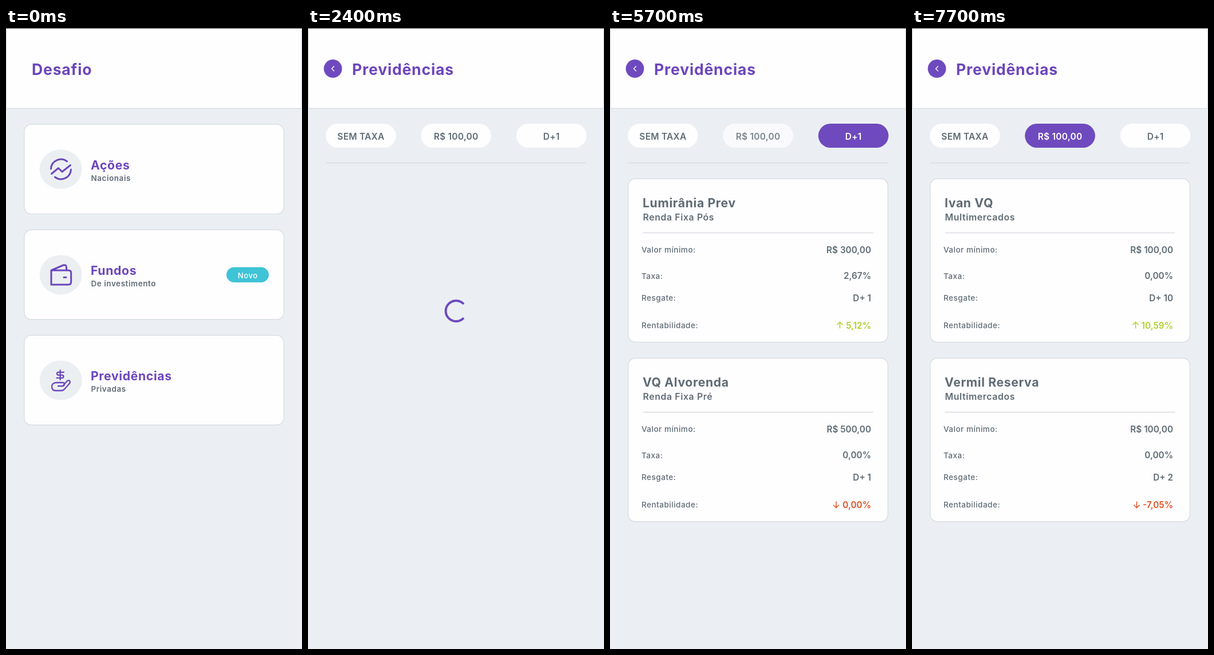
Recreate the animation shown at these times as an HTML page. Size 517 by 1084 pixels, loop 8 s.

```html
<!DOCTYPE html>
<html lang="pt-BR">
<head>
<meta charset="utf-8">
<title>Desafio</title>
<style>
  html, body { margin: 0; width: 100%; height: 100%; overflow: hidden; background: #ebeff3; }
  svg { display: block; width: 517px; height: 1084px; }
  text { font-family: Inter, "Open Sans", sans-serif; fill: #5f6b74; }
  .head { font-size: 26.6px; font-weight: 700; letter-spacing: .03em; fill: #6b46bb; }
  .title { font-size: 21.2px; font-weight: 700; letter-spacing: .03em; }
  .purple { fill: #6b46bb; }
  .sub { font-size: 13.5px; font-weight: 600; letter-spacing: .04em; }
  .kind { font-size: 15.8px; font-weight: 600; letter-spacing: .04em; }
  .label { font-size: 13.6px; font-weight: 500; letter-spacing: .034em; }
  .value { font-size: 15.3px; font-weight: 600; text-anchor: end; }
  .pill { font-size: 15.5px; font-weight: 600; letter-spacing: .015em; text-anchor: middle; }
  .note { font-size: 16px; font-weight: 500; letter-spacing: .04em; text-anchor: middle; }
  .badge { font-size: 13.2px; font-weight: 500; letter-spacing: .04em; text-anchor: middle; fill: #fff; }
  .card { fill: #fefdff; stroke: #d9dee1; stroke-width: 1.4; }
  .rule { stroke: #d9dde1; stroke-width: 1.7; }
  .icon { fill: none; stroke: #6b46bb; stroke-width: 3; stroke-linecap: round; stroke-linejoin: round; }
</style>
</head>
<body>
<svg id="stage" viewBox="0 0 517 1084"></svg>
<script>
const LOOP = 8000, STEP = 100, PURPLE = '#6e4abe', WHITE = '#fefdff';
const stage = document.getElementById('stage');

const OPEN = 1900, LOADED = 2500;
const TOGGLE_DAY = 3570, TOGGLE_MIN = 5850, UNTOGGLE_DAY = 7450;

const funds = [
  { name: 'Ivan VQ', kind: 'Multimercados', min: 100, fee: '0,00%', days: 10, gain: '10,59%', up: true, arrowX: 390.5 },
  { name: 'Vermil Reserva', kind: 'Multimercados', min: 100, fee: '0,00%', days: 2, gain: '-7,05%', up: false, arrowX: 392.5 },
  { name: 'Lumirânia Prev', kind: 'Renda Fixa Pós', min: 300, fee: '2,67%', days: 1, gain: '5,12%', up: true, arrowX: 401.5 },
  { name: 'VQ Alvorenda', kind: 'Renda Fixa Pré', min: 500, fee: '0,00%', days: 1, gain: '0,00%', up: false, arrowX: 395 }
];

const icons = [
  '<path d="M78.5 246A17.5 17.5 0 0 1 106.5 232.8M113.5 247A17.5 17.5 0 0 1 85.5 260.2M79.5 254.5 91.5 244.5 98 251 112.5 239.5"/>',
  '<path d="M79 423H109Q113.7 423 113.7 427.5V443Q113.7 448 109 448H79ZM79 423 100 414Q105.5 412.5 105.5 418V423M101 435.2H105"/>',
  '<path stroke-width="2.3" d="M94.7 597.5V614M101 600.8H91.5a2.5 2.5 0 0 0 0 5H98a2.5 2.5 0 0 1 0 5H88.5M81.5 621.5Q84 619 88 619H99Q102.3 619 102 622 101.5 625 98 625H91M100 624 106 617Q109 613.8 111 616 113 618 110.5 621L102 630.5Q100 633 96 633H86Q80 632.5 80 626 80 623.5 81.5 621.5"/>'
];

const clamp = x => Math.max(0, Math.min(1, x));
const ease = x => (x = clamp(x), x < .5 ? 2 * x * x : 1 - 2 * (1 - x) ** 2);
const press = (t, down, up) => 1 - .2 * ease((t - down) / 150) * (1 - ease((t - up) / 250));
const text = (x, y, cls, str, extra = '') => `<text x="${x}" y="${y}" class="${cls}" ${extra}>${str}</text>`;
const group = (body, attrs) => `<g ${attrs}>${body}</g>`;
const rule = (x1, x2, y) => `<path class="rule" d="M${x1} ${y}H${x2}"/>`;

const frame = title => `<rect width="517" height="1084" fill="#ebeff3"/>
  <rect x=".6" y=".6" width="515.8" height="139.8" class="card"/>
  <path d="M0 .4H517" stroke="#38383c"/>${title}`;

function homeCard(i, title, sub, opacity = 1) {
  const y = i * 184.2;
  return group(`<rect x="31.8" y="${168 + y}" width="453.6" height="156.6" rx="12.5" class="card"/>
    <ellipse cx="95.7" cy="${246.5 + y}" rx="37" ry="34.5" fill="#ebeff2"/>
    ${group(icons[i], 'class="icon"')}
    ${text(148, 246.5 + y, 'title purple', title)}${text(148.5, 266.5 + y, 'sub', sub)}`, `opacity="${opacity}"`);
}

function home(t) {
  return frame(text(45, 82, 'head', 'Desafio'))
    + homeCard(0, 'Ações', 'Nacionais')
    + homeCard(1, 'Fundos', 'De investimento')
    + '<rect x="385" y="417.5" width="74" height="26.5" rx="13.25" fill="#3fc3d6"/>'
    + text(422.3, 436.5, 'badge', 'Novo')
    + homeCard(2, 'Previdências', 'Privadas', press(t, 1650, 1880));
}

function filter(x, label, on, opacity) {
  return group(`<rect x="${x}" y="167" width="122.7" height="42" rx="21" fill="${on ? PURPLE : WHITE}"/>
    ${text(x + 61.4, 194.8, 'pill', label, on ? 'style="fill:#fff"' : '')}`, `opacity="${opacity}"`);
}

function fundCard(fund, i) {
  const color = fund.up ? '#aed026' : '#df5122';
  const row = (y, label, value, extra) => text(55, y, 'label', label) + text(456, y + .7, 'value', value, extra);
  const head = fund.up ? 'M-5 -1 0 -6 5 -1' : 'M-5 0 0 5 5 0';
  return group(`<rect x="31.8" y="263" width="453.6" height="285.5" rx="12.5" class="card"/>
    ${text(57, 313, 'title', fund.name)}${text(57.5, 336, 'kind', fund.kind)}${rule(57.5, 459.5, 357.5)}
    ${row(392.3, 'Valor mínimo:', `R$ ${fund.min},00`)}
    ${row(437.5, 'Taxa:', fund.fee)}
    ${row(476, 'Resgate:', 'D+ ' + fund.days)}
    ${row(524, 'Rentabilidade:', fund.gain, `style="fill:${color}"`)}
    <path transform="translate(${fund.arrowX} 519.3)" d="M0 -6V5${head}" fill="none" stroke="${color}" stroke-width="1.5"/>`,
    `transform="translate(0 ${i * 313.2})"`);
}

function spinner(t) {
  return `<path transform="translate(258.5 494) rotate(${(t - 2400) * .36})" d="M13.4 12.1A18 18 0 1 1 13.4 -12.1"
    fill="none" stroke="${PURPLE}" stroke-width="4"/>`;
}

function results(t, minOn, dayOn) {
  if (t < LOADED) return spinner(t);
  const found = funds.filter(f => (!minOn || f.min <= 100) && (!dayOn || f.days === 1));
  if (found.length) return found.slice(0, 3).map(fundCard).join('');
  return text(258.8, 309, 'note', 'Nenhum resultado foi encontrado')
    + text(259, 330, 'note', 'para os filtros selecionados.');
}

function pensions(t) {
  const minOn = t >= TOGGLE_MIN, dayOn = t >= TOGGLE_DAY && t < UNTOGGLE_DAY;
  const dayOpacity = press(t, 3250, TOGGLE_DAY) * press(t, 7290, UNTOGGLE_DAY);
  return frame(text(77, 82, 'head', 'Previdências'))
    + `<circle cx="43.5" cy="71" r="15.9" fill="${PURPLE}"/>
       <path d="M45.8 66.5 41.5 71 45.8 75.5" fill="none" stroke="#fff" stroke-width="1.3"/>`
    + filter(31, 'SEM TAXA', false, 1)
    + filter(197.2, 'R$ 100,00', minOn, press(t, 5550, TOGGLE_MIN))
    + filter(363.8, 'D+1', dayOn, dayOpacity)
    + rule(31, 486, 235.5)
    + results(t, minOn, dayOn);
}

const zoom = (body, scale, opacity) => group(body,
  `opacity="${opacity}" transform="translate(258.5 542) scale(${scale}) translate(-258.5 -542)"`);

function scene(t) {
  if (t <= OPEN) return home(t);
  const p = clamp((t - OPEN) / 400);
  if (p === 1) return pensions(t);
  const moved = 1 - (1 - p) ** 3;
  return zoom(home(t), 1 + .1 * moved, 1) + zoom(pensions(t), .9 + .1 * moved, clamp(p * 2));
}

const start = performance.now();
let shown = -1;
function tick(now) {
  const t = Math.floor(Math.max(0, now - start) % LOOP / STEP) * STEP;
  if (t !== shown) stage.innerHTML = scene(shown = t);
  requestAnimationFrame(tick);
}
tick(start);
</script>
</body>
</html>
```
